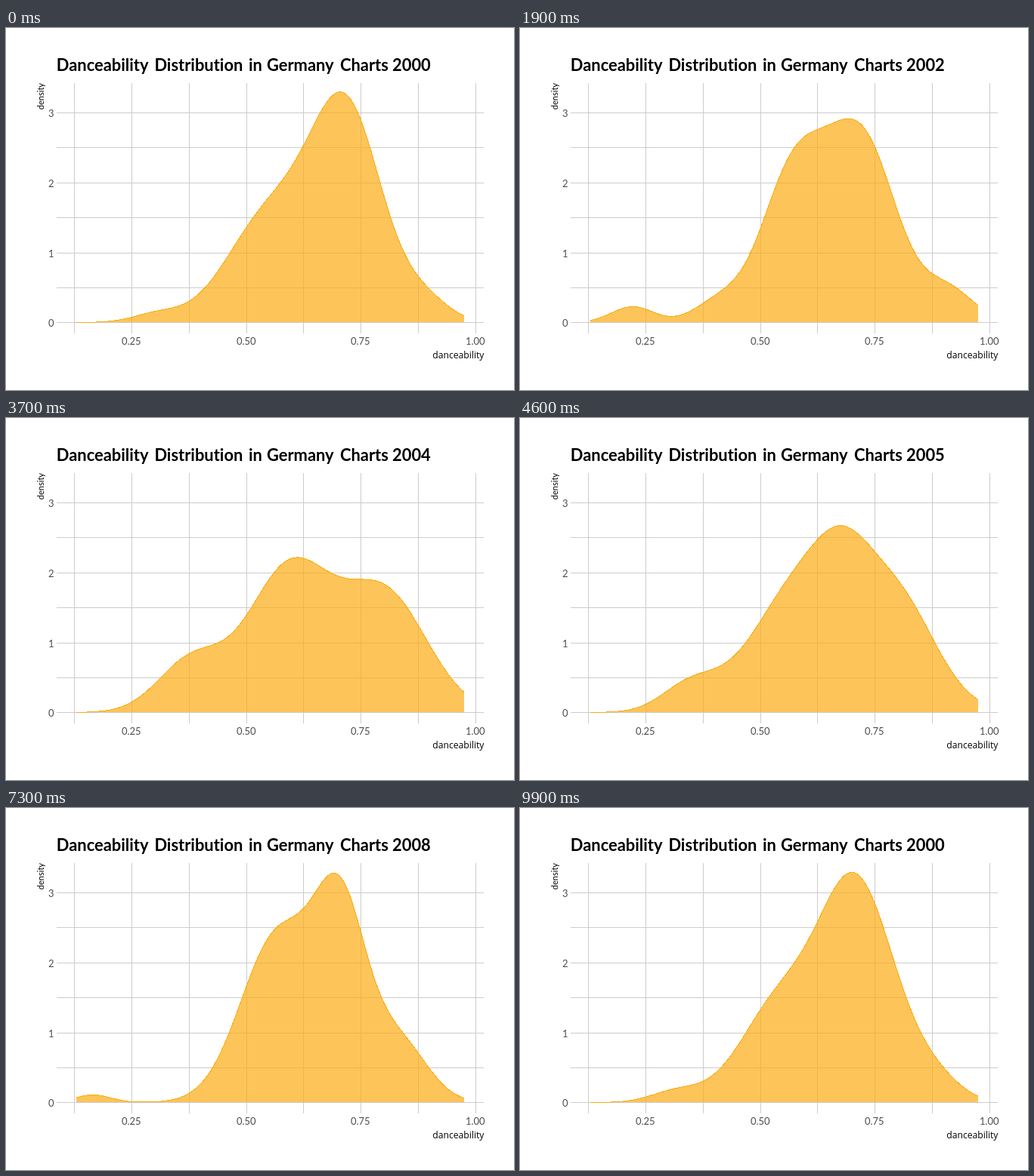
These frames come from a looping animation (672x480 px, 10 s). An HTML page:

```html
<!DOCTYPE html>
<html lang="en">
<head>
<meta charset="utf-8">
<title>Danceability density by year</title>
<style>
  html, body { margin: 0; width: 100%; height: 100%; overflow: hidden; background: #fff; }
  svg { display: block; width: 672px; height: 480px; font-family: Lato, sans-serif; font-variant-ligatures: none; }
  .grid { stroke: #ccc; fill: none; shape-rendering: crispEdges; }
  .title { font-size: 21.9px; font-weight: 700; }
  .tick { font-size: 13px; fill: #4d4d4d; }
  .name { font: 12.2px "Open Sans", sans-serif; text-anchor: end; }
  .side { font-size: 11px; text-anchor: end; }
  #area { fill: #fbac13; fill-opacity: .7; shape-rendering: crispEdges; }
  #edge { fill: none; stroke: #faab0c; shape-rendering: crispEdges; }
</style>
</head>
<body>
<svg viewBox="0 0 672 480">
  <path id="grid" class="grid"/>
  <path id="area"/>
  <path id="edge"/>
  <text class="title" y="56.6"><tspan x="66.8">Danceability</tspan> <tspan x="196.4">Distribution</tspan> <tspan x="321">in</tspan> <tspan x="345">Germany</tspan> <tspan x="442">Charts</tspan> <tspan id="year" x="511">2000</tspan></text>
  <g id="ticks" class="tick"></g>
  <text class="name" x="632.5" y="438">danceability</text>
  <text class="side" transform="translate(49.8 73) rotate(-90)">density</text>
</svg>
<script>
const $ = id => document.getElementById(id);
const LEFT = 93, RIGHT = 606, BASE = 390.5;

// A curve is a sum of bell bumps: centre, height, width in px
const bells = (...bumps) => x =>
  bumps.reduce((sum, [c, h, w]) => sum + h * Math.exp(-(((x - c) / w) ** 2) / 2), 0);
const mix = (a, b, k) => x => a(x) + (b(x) - a(x)) * k;

const curves = {
  2000: bells([200, 11, 32], [350, 142, 57], [451, 272, 47], [556, 26, 32]),
  2002: bells([149, 21, 28], [262, 26, 32], [362, 195, 43], [452, 240, 46], [567, 42, 34]),
  2004: bells([245, 68, 44], [375, 190, 55], [501, 156, 56]),
  2006: bells([110, 7, 30], [250, 51, 45], [352, 135, 36], [445, 235, 48], [555, 66, 50]),
  2008: bells([115, 10, 24], [360, 222, 49], [443, 235, 34], [519, 80, 38]),
  2009: bells([210, 38, 37], [339, 205, 44], [455, 190, 61]),
  2010: bells([215, 25, 32], [340, 118, 45], [428, 270, 42], [506, 120, 42])
};
const between = (a, b) => mix(curves[a], curves[b], .5);
curves[2001] = between(2000, 2009);
curves[2003] = between(2000, 2004);
curves[2005] = between(2004, 2010);
curves[2007] = between(2006, 2008);

// Changes in ticks of 100 ms; the first two are a step longer
const COUNT = 11;
const startOf = i => i < 2 ? 5 + 10 * i : 7 + 9 * i;
const stepsOf = i => i < 2 ? 5 : 4;

function trace(curve) {
  const points = [];
  for (let x = LEFT; x <= RIGHT; x += 3) points.push(x + ' ' + (BASE - curve(x)).toFixed(2));
  return 'M' + points.join('L');
}

function draw(tick) {
  let i = 0;
  while (i < COUNT - 1 && tick >= startOf(i + 1)) i++;
  const k = Math.min(1, Math.max(0, (tick - startOf(i) + 1) / stepsOf(i)));
  const from = 2000 + i, to = 2000 + (i + 1) % COUNT;
  const d = trace(mix(curves[from], curves[to], k));
  $('edge').setAttribute('d', d);
  $('area').setAttribute('d', `${d}V390H${LEFT}Z`);
  $('year').textContent = k < .5 ? from : to;
}

function label(text, x, y, anchor) {
  const el = document.createElementNS('http://www.w3.org/2000/svg', 'text');
  el.setAttribute('x', x);
  el.setAttribute('y', y);
  el.setAttribute('text-anchor', anchor);
  el.textContent = text;
  $('ticks').append(el);
}

const column = i => Math.floor(90.6 + 75.8 * i);
const row = i => Math.floor(390.9 - 46.4 * i);
let grid = '';
for (let i = 0; i < 8; i++) {
  grid += `M${column(i) + .5} 73V405`;
  if (i < 7) grid += `M67 ${row(i) + .5}H632`;
  if (i % 2) label(((i + 1) / 8).toFixed(2), column(i) - .2, 420, 'middle');
  else label(i / 2, 63.5, row(i) + 5.5, 'end');
}
$('grid').setAttribute('d', grid);

let shown = -1;
const begin = performance.now();
function loop() {
  const tick = Math.floor((performance.now() - begin) % 10000 / 100);
  if (tick !== shown) draw(shown = tick);
  requestAnimationFrame(loop);
}
loop();
</script>
</body>
</html>
```
